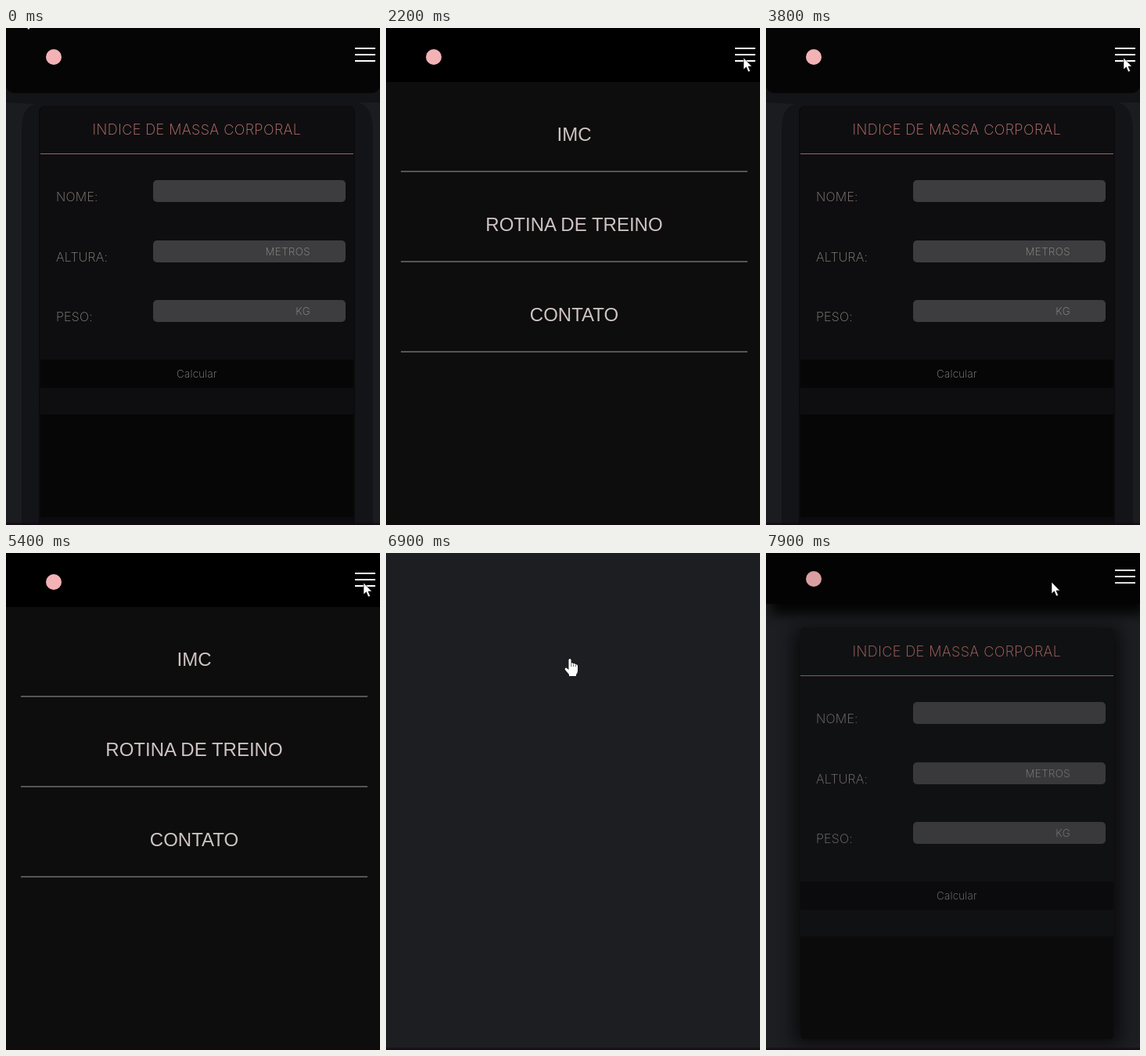
Recreate the animation shown at these times as an HTML page. Size 478 by 634 pixels, loop 8 s.

```html
<!DOCTYPE html>
<html lang="pt-BR">
<head>
<meta charset="utf-8">
<title>Indice de massa corporal</title>
<style>
  html, body { margin: 0; width: 100%; height: 100%; overflow: hidden; background: #1d1e22; }
  #stage { position: relative; width: 478px; height: 634px; overflow: hidden; }
  #stage > *, #menu > svg { position: absolute; left: 0; top: 0; }
  svg { display: block; overflow: visible; }
  #menu { width: 478px; height: 0; overflow: hidden; }
  #menu text { font: 24px "Liberation Sans", Arial, sans-serif; fill: #d0c3c4; text-anchor: middle; }
  #page text { font-family: Inter, sans-serif; font-weight: 200; }
  .title { font-size: 18px; letter-spacing: .025em; fill: #c77872; text-anchor: middle; }
  .label { font-size: 16px; letter-spacing: .015em; fill: #8f8780; }
  .hint { font-size: 13.33px; letter-spacing: .035em; fill: #98968f; text-anchor: end; }
  .button { font-size: 13.33px; letter-spacing: .02em; fill: #8f9296; text-anchor: middle; }
  .field { fill: #3d3d3f; }
</style>
</head>
<body>
<div id="stage">
  <svg id="page" width="478" height="634">
    <defs>
      <filter id="wide" x="-20%" y="-20%" width="140%" height="140%"><feGaussianBlur stdDeviation="11"/></filter>
      <filter id="near" x="-20%" y="-50%" width="140%" height="200%"><feGaussianBlur stdDeviation="8"/></filter>
    </defs>
    <g id="flat">
      <path fill="#1b1c20" d="M0 0H478V634H0z"/>
      <path fill="#131417" d="M0 70H478V95H450Q469 100 469 130V634H20V130Q20 100 38 97L0 95z"/>
      <rect x="42" y="99" width="404" height="545" rx="8" fill="#0b0b0d"/>
      <rect x="0" y="-20" width="478" height="103" rx="10" fill="#050505"/>
      <rect x="44" y="99" width="400" height="525" rx="6" fill="#0e0e10"/>
      <path fill="#060606" d="M44 423H444V459H44zM44 493H444V624H44z"/>
    </g>
    <g id="soft">
      <rect x="36" y="100" width="416" height="530" filter="url(#wide)" opacity=".75"/>
      <rect x="6" y="-40" width="478" height="122" filter="url(#near)"/>
      <path d="M0 -20H478V69H0z"/>
      <rect x="44" y="99" width="400" height="525" rx="6" fill="#0f1012"/>
      <path fill="#0a0a0c" d="M44 423H444V459H44z"/>
      <path fill="#09090b" d="M44 493H444V618Q444 624 438 624H50Q44 624 44 618z"/>
    </g>
    <path fill="#a9605f" d="M44 160H444v1H44z"/>
    <text class="title" x="244" y="136">INDICE DE MASSA CORPORAL</text>
    <g id="fields"></g>
    <text class="button" x="244" y="446">Calcular</text>
  </svg>

  <div id="menu">
    <svg width="478" height="634">
      <path fill="#0d0d0d" d="M0 0H478V634H0z"/>
      <path d="M0 0H478V69H0z"/>
      <g id="links"></g>
    </svg>
  </div>

  <svg id="header" width="478" height="83">
    <circle cx="61" cy="37" r="10" fill="#f3b2b6"/>
    <path fill="#fff" d="M446 25h26v2h-26zM446 33h26v2h-26zM446 41h26v2h-26z"/>
  </svg>

  <svg width="478" height="634"><path fill="#180812" opacity=".6" d="M0 631H478V634H0z"/></svg>

  <svg id="cursor" width="1" height="1">
    <path id="arrow" fill="#fff" stroke="#000" stroke-width=".6" d="M0 0V15L3.4 11.8 6 18 8.6 17 6 11H10.6z"/>
    <g id="hand">
      <path fill="#fff" d="M-1.500 1Q0-1 1.500 1V6Q3.500 4.500 4.500 6.500 6.500 5 7.500 7.500 9.500 6.500 10 9V15Q10 18 8 20V22H-1V20L-6 14Q-7 11.500-4.500 11.500L-1.500 14z"/>
      <path fill="none" stroke="#1d1e22" stroke-width=".7" d="M1.800 6v4M4.700 7v3M7.500 8v2"/>
    </g>
  </svg>
</div>

<script>
const LOOP = 8000, TICK = 100;
const $ = id => document.getElementById(id);

$("fields").innerHTML = [["NOME:", "", 194], ["ALTURA:", "METROS", 271], ["PESO:", "KG", 347]]
  .map(([label, hint, y]) => `
    <text class="label" x="64" y="${y + 27}">${label}</text>
    <rect class="field" x="188" y="${y}" width="246" height="28" rx="5"/>
    <text class="hint" x="389" y="${y + 19}">${hint}</text>`).join("");

$("links").innerHTML = ["IMC", "ROTINA DE TREINO", "CONTATO"]
  .map((name, i) => `
    <text x="240.500" y="${144 + 115 * i}">${name}</text>
    <path fill="#555" d="M19 ${182 + 115 * i}H462v2H19z"/>`).join("");

const tracks = [];

// Each step is [time, value, easing]; the last value holds to the loop's end.
function track(id, steps, toFrame) {
  const all = [...steps, [LOOP, steps[steps.length - 1][1]]];
  const frames = all.map(([time, value, easing = "linear"]) =>
    ({ offset: time / LOOP, easing, ...toFrame(value) }));
  const animation = $(id).animate(frames, { duration: LOOP, iterations: Infinity });
  animation.pause();
  tracks.push(animation);
}

const opacity = value => ({ opacity: value });
const height = value => ({ height: value + "px" });
const HOLD = "step-end";

const reveal = [[0, 1, HOLD], [6900, 0, HOLD], [7000, 0], [7200, .2], [7300, .2], [7400, .4], [LOOP, 1]];
const slideIn = p => ({ opacity: p, transform: `translateY(${-40 * (1 - p)}px)` });
track("page", reveal, slideIn);
track("header", reveal, slideIn);
track("flat", [[0, 1, HOLD], [6900, 0]], opacity);
track("soft", [[0, 0, HOLD], [6900, 1]], opacity);

track("menu", [
  [0, 0, HOLD], [1700, 69, "ease"], [2200, 634, HOLD],
  [3225, 634, "ease"], [3725, 69, HOLD], [3800, 0, HOLD],
  [4900, 69, "ease"], [5400, 634, HOLD], [6900, 0]
], height);

track("cursor", [
  [0, [22, -16]], [100, [82, 78]], [200, [150, 115]], [300, [210, 105]], [400, [247, 83]],
  [500, [247, 83], "ease-in-out"], [1100, [458, 47]],
  [1200, [458, 47]], [1400, [457, 40]], [1500, [457, 38]],
  [5900, [457, 38]], [6000, [411, 39]],
  [6100, [411, 39]], [6300, [325, 74]], [6500, [248, 125]], [6600, [235, 135]],
  [7300, [235, 135], "ease-in-out"], [7900, [365, 37]]
], ([x, y]) => ({ transform: `translate(${x}px, ${y}px)` }));
track("hand", [[0, 0, HOLD], [6500, 1, HOLD], [7400, 0]], opacity);
track("arrow", [[0, 1, HOLD], [6500, 0, HOLD], [7400, 1]], opacity);

const start = performance.now();
function render() {
  const elapsed = (performance.now() - start) % LOOP;
  const time = Math.floor(elapsed / TICK) * TICK + .1;
  for (const animation of tracks) animation.currentTime = time;
  requestAnimationFrame(render);
}
render();
</script>
</body>
</html>
```
